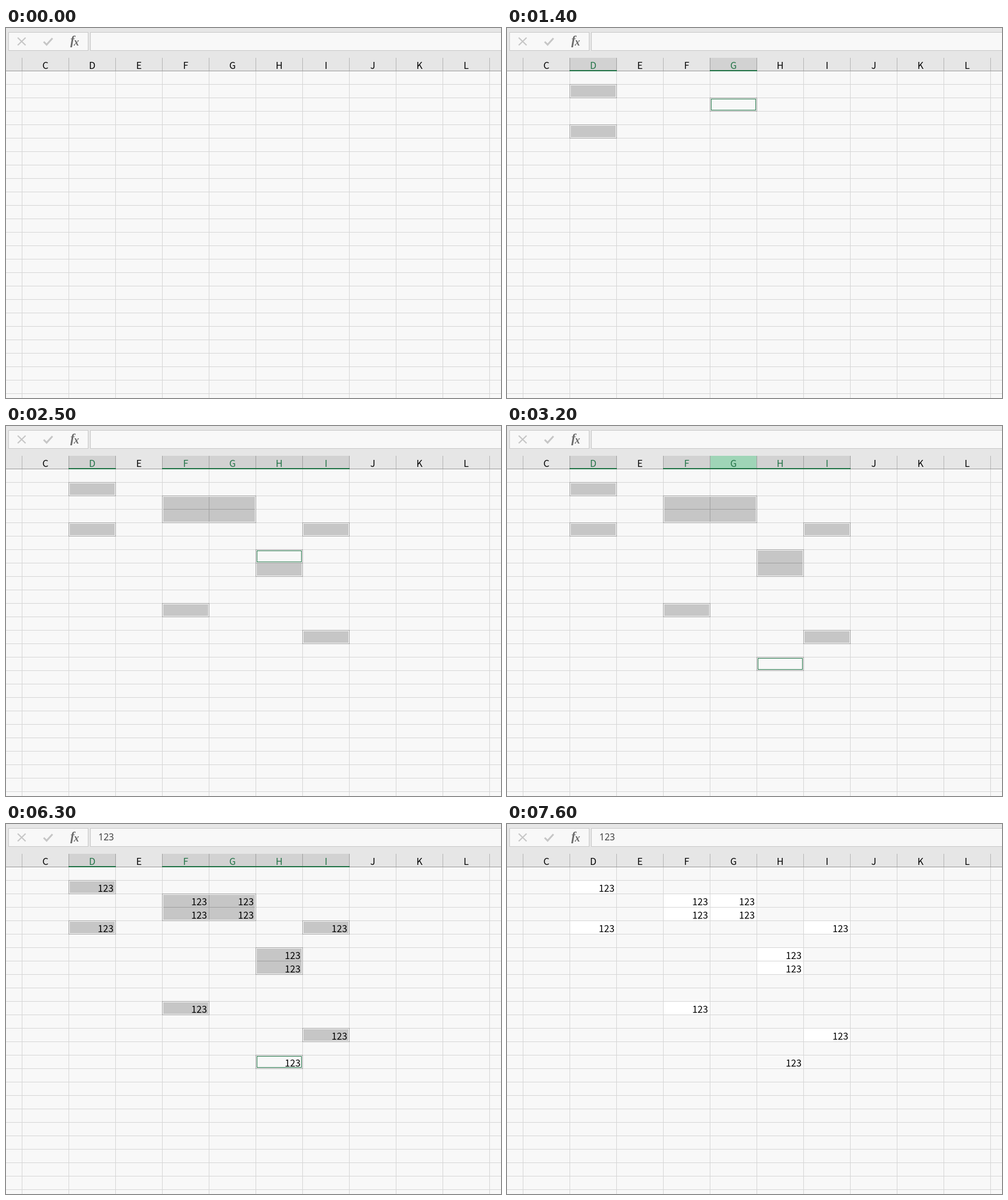
An HTML page for the animation above (7700 ms loop, 847x633 px).

```html
<!DOCTYPE html>
<html lang="en">
<head>
<meta charset="utf-8">
<title>Filling scattered cells</title>
<style>
  html, body { margin: 0; width: 100%; height: 100%; overflow: hidden; background: #f8f8f8; }
  svg { display: block; width: 847px; height: 633px; }
  rect { shape-rendering: crispEdges; }
  text { font: 16.2px "Noto Sans CJK SC", "Noto Sans CJK", "Noto Sans", sans-serif; fill: #000; }
  .bar { font: 15.6px "Noto Sans", "Open Sans", sans-serif; fill: #444; }
  .fx { font: italic bold 22px "Liberation Serif", serif; fill: #6b6b6b; }
  .fx.x { font-size: 18px; }
  .tip { font-size: 12px; fill: #555; }
</style>
</head>
<body>
<svg id="stage" viewBox="0 0 847 633"></svg>
<script>
const LOOP = 7700, W = 80, H = 23, LEFT = 27, TOP = 73;
const GREEN = '#217346', PAPER = '#f8f8f8', EDGE = '#a0a0a0';
const stage = document.getElementById('stage');

// time, column, row, and size when the pick grows into a block
const PICKS = [
  [600, 'D', 1], [1100, 'D', 4], [1400, 'G', 2], [1500, 'F', 2, 2, 2], [1600, 'F', 10],
  [1900, 'I', 4], [2100, 'I', 12], [2400, 'H', 6], [2500, 'H', 6, 1, 2], [2600, 'H', 14]
].map(([at, name, row, w, h]) =>
  ({ at, col: name.charCodeAt(0) - 67, row, w: w || 1, h: h || 1, grown: !!w }));

const TYPED = [[4100, '1'], [4400, '12'], [4700, '123']];
const CARET_FLIPS = [5100, 5500, 5600, 6000, 6100];
const HOVERS = [[3200, 3300, 4], [7100, 7600, 10]];
const TIPS = [[3900, 4100, 353], [7000, 7100, 354]];
const COMMIT = 6300, CLEAR = 7600;

const TIMES = [...new Set([
  0, COMMIT, CLEAR, ...PICKS.map(p => p.at), ...TYPED.map(p => p[0]), ...CARET_FLIPS,
  ...HOVERS.flatMap(h => h.slice(0, 2)), ...TIPS.flatMap(p => p.slice(0, 2))
])].sort((a, b) => a - b);

const colX = c => LEFT + c * W;
const rowY = r => TOP + r * H;
const during = (t, [from, to]) => t >= from && t < to;

const rect = (x, y, w, h, fill) =>
  `<rect x="${x}" y="${y}" width="${w}" height="${h}" fill="${fill}"/>`;
const frame = (x, y, w, h, color, n = 1) =>
  rect(x, y, w, n, color) + rect(x, y + h - n, w, n, color) +
  rect(x, y, n, h, color) + rect(x + w - n, y, n, h, color);
const text = (x, y, s, anchor = 'start', extra = '') =>
  `<text x="${x}" y="${y}" text-anchor="${anchor}" ${extra}>${s}</text>`;
const stroke = (d, color, width) =>
  `<path d="${d}" fill="none" stroke="${color}" stroke-width="${width}"/>`;

function formulaBar(value, editing) {
  const ink = editing ? '#6b6b6b' : '#c6c6c6';
  return rect(0, 0, 847, TOP, '#e6e6e6') +
    rect(4, 7, 137, 32, PAPER) + frame(4, 7, 137, 32, '#c8c8c8') +
    rect(144, 7, 710, 32, PAPER) + frame(144, 7, 710, 32, '#c8c8c8') +
    stroke('M20 16.5L33.5 29.5M33.5 16.5L20 29.5', ink, 2.1) +
    stroke('M64.5 23.5L69.5 28.5L79.5 17.5', ink, 3) +
    text(110, 28, 'f', 'start', 'class="fx"') + text(116, 29.5, 'x', 'start', 'class="fx x"') +
    text(158, 28, value, 'start', 'class="bar"');
}

function grid() {
  let out = '';
  for (let c = 0; c <= 10; c++) out += rect(colX(c), TOP, 1, 560, '#d6d6d6');
  for (let r = 1; r <= 24; r++) out += rect(0, rowY(r), 847, 1, '#d6d6d6');
  return out;
}

function headers(chosen, hover) {
  let out = rect(0, TOP, 847, 1, '#9b9b9b');
  for (let c = 0; c <= 10; c++) out += rect(colX(c), 51, 1, 22, '#b5b5b5');
  for (let c = 0; c <= 10; c++) {
    const x = colX(c), on = chosen.has(c);
    if (on) {
      out += rect(x, 51, W + 1, 21, '#d2d2d2') + rect(x, 51, 1, 21, EDGE) +
        rect(x + W, 51, 1, 21, EDGE) + rect(x, 72, W + 1, 2, GREEN);
    }
    if (c === hover) out += rect(x + 1, 51, W - 1, on ? 21 : 22, '#9fd5b7');
    if (c < 10) {
      out += text(x + 40.5, 70, String.fromCharCode(67 + c), 'middle', on ? `style="fill:${GREEN}"` : '');
    }
  }
  return out;
}

function block(p) {
  const x = colX(p.col), y = rowY(p.row), w = p.w * W, h = p.h * H;
  let out = rect(x, y, w + 1, h + 1, '#fff') + frame(x, y, w + 1, h + 1, EDGE) +
    rect(x + 2, y + 2, w - 3, h - 3, '#c6c6c6');
  for (let i = 1; i < p.w; i++) out += rect(x + i * W, y + 2, 1, h - 3, EDGE);
  for (let i = 1; i < p.h; i++) out += rect(x + 2, y + i * H, w - 3, 1, EDGE);
  return out;
}

function activeCell(p, alone, editing) {
  const x = colX(p.col), y = rowY(p.row);
  if (alone) {
    return frame(x - 1, y - 1, W + 3, H + 3, GREEN, 2) +
      frame(x + 1, y + 1, W - 1, H - 1, '#fff') +
      rect(x + W - 3, y + H - 3, 6, 6, '#fff') + rect(x + W - 2, y + H - 2, 5, 5, GREEN);
  }
  const cell = rect(x + 1, y + 1, W - 1, H - 1, PAPER) + frame(x, y, W + 1, H + 1, EDGE);
  return editing ? cell
    : cell + frame(x + 1, y + 1, W - 1, H - 1, '#fff') + frame(x + 2, y + 2, W - 3, H - 3, GREEN);
}

function values() {
  let out = '';
  for (const p of PICKS) {
    const next = PICKS[PICKS.indexOf(p) + 1];
    if (next && next.grown) continue;
    for (let i = 0; i < p.w; i++)
      for (let j = 0; j < p.h; j++)
        out += text(colX(p.col + i) + 77, rowY(p.row + j) + 19.5, '123', 'end');
  }
  return out;
}

function bleached() {
  return PICKS.map((p, k) => {
    const x = colX(p.col) + 1, y = rowY(p.row) + 1;
    if (k === PICKS.length - 1) return frame(x, y, W - 1, H - 1, '#fff');
    let out = '';
    for (let i = 0; i < p.w; i++)
      for (let j = 0; j < p.h; j++) out += rect(x + i * W, y + j * H, W - 1, H - 1, '#fff');
    return out;
  }).join('');
}

function tooltip(x) {
  return rect(x + 1, 40, 50, 25, '#d9d9d9') + rect(x, 39, 50, 25, '#fff') +
    frame(x, 39, 50, 25, '#bebebe') + text(x + 25, 56, '编辑栏', 'middle', 'class="tip"');
}

function draw(t) {
  const live = t < CLEAR ? PICKS.filter(p => p.at <= t) : [];
  const typed = TYPED.filter(p => p[0] <= t).map(p => p[1]).pop() || '';
  const editing = during(t, [TYPED[0][0], COMMIT]);
  const hover = HOVERS.find(h => during(t, h));
  const tip = TIPS.find(p => during(t, p));
  const chosen = new Set(live.flatMap(p => p.w > 1 ? [p.col, p.col + 1] : [p.col]));

  let out = rect(0, 0, 847, 633, PAPER) + formulaBar(typed, editing) + grid() +
    headers(chosen, hover ? hover[2] : -1);

  if (live.length) {
    const last = live[live.length - 1];
    const active = last.grown ? live[live.length - 2] : last;
    for (const p of live) if (p !== active) out += block(p);
    out += activeCell(active, live.length === 1, editing);
  }
  if (t >= CLEAR) out += bleached();
  if (t >= COMMIT) out += values();
  if (editing) {
    const x = colX(5) + 4, y = rowY(14);
    out += text(x, y + 19.5, typed);
    if (CARET_FLIPS.filter(f => f <= t).length % 2 === 0)
      out += rect(x + 9 * typed.length, y + 1, 1, 22, '#000');
  }
  if (tip) out += tooltip(tip[2]);
  stage.innerHTML = out;
}

let shown = -1;
function tick() {
  const now = performance.now() % LOOP;
  const step = TIMES.filter(t => t <= now).pop();
  if (step !== shown) draw(shown = step);
  requestAnimationFrame(tick);
}
tick();
</script>
</body>
</html>
```
